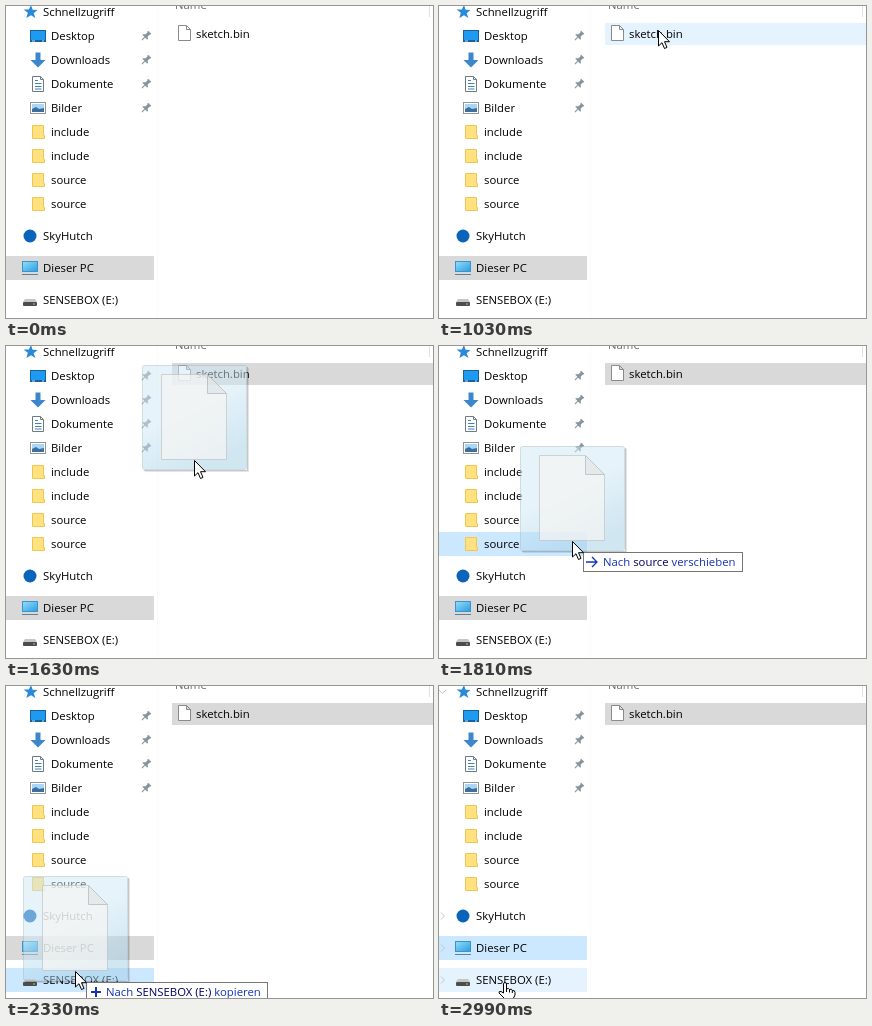
An HTML page that plays this animation: 427x312 px, repeating every 3020 ms.

```html
<!DOCTYPE html>
<html lang="de">
<head>
<meta charset="utf-8">
<title>Datei kopieren</title>
<style>
html, body { margin: 0; height: 100%; overflow: hidden; background: #fff; }
svg { display: block; width: 100vw; height: 100vh; }
text { font: 11.35px "Open Sans", "Noto Sans", sans-serif; white-space: pre; }
</style>
</head>
<body>
<svg viewBox="0 0 427 312">
  <defs>
    <linearGradient id="glass" x2=".5" y2="1">
      <stop stop-color="#cfe8f5"/><stop offset=".5" stop-color="#cfe9f6"/><stop offset="1" stop-color="#a3d0e7"/>
    </linearGradient>
    <linearGradient id="screen" x2="1" y2="1">
      <stop stop-color="#8fdcfb"/><stop offset="1" stop-color="#2f9fe0"/>
    </linearGradient>
    <g id="star"><path d="M1-7 2.6-2.2 7.5-2 3.7 1.2 5.4 6 1 3.3-3.6 6-2.2.8-6.5-2.6-1.2-2.6Z" fill="#2b8ad8"/></g>
    <g id="desktop">
      <rect x="-8" y="-6" width="16" height="12" fill="#14639f"/>
      <rect x="-7" y="-5" width="14" height="9" fill="#1e9bf0"/>
      <path d="M-6 5H-3M4 5H6" stroke="#bfe3ff"/>
    </g>
    <g id="down"><path d="M-2.5-7.5H2.5V0H7.5L0 7.5-7.5 0H-2.5Z" fill="#3c87cb"/></g>
    <g id="doc">
      <path d="M-5.5-7.5H2.5L5.5-4.5V7.5H-5.5Z" fill="#fff" stroke="#6f7b84"/>
      <path d="M-3-3.5H0M-3-.5H3.5M-3 2.5H3.5M-3 5H3.5" stroke="#3f83c0"/>
      <path d="M2.5-7.5V-4.5H5.5" fill="none" stroke="#6f7b84"/>
    </g>
    <g id="picture">
      <rect x="-7.5" y="-5.5" width="15" height="11" fill="#fff" stroke="#8b969d"/>
      <rect x="-6" y="-4" width="12" height="8" fill="#a9d6f5"/>
      <path d="M-6 4V1L-2-1 1 1 6 0V4Z" fill="#3d6f9c"/>
    </g>
    <g id="folder">
      <path d="M-5.5-6.500H5.500V3.500H6.500V6.500H-5.500Z" fill="#ffe17f" stroke="#efc750"/>
    </g>
    <g id="cloud"><circle r="6.5" fill="#0a64b9"/></g>
    <g id="pc">
      <rect x="-8" y="-7" width="16" height="11" fill="#3d93c9"/>
      <rect x="-7" y="-6" width="14" height="9" fill="url(#screen)"/>
      <path d="M-8 6.500H8" stroke="#5c8299"/>
    </g>
    <g id="drive">
      <path d="M-5-1H5L7 2H-7Z" fill="#c6c6c6"/>
      <rect x="-7" y="2" width="14" height="4" rx="1" fill="#4c4c4c"/>
      <path d="M3 4H5" stroke="#7ce07c"/>
    </g>
    <g id="pin" transform="rotate(45) scale(.88)">
      <path d="M-2.5-6H2.5V-5L1.8-4V-1L4 1V2H-4V1L-1.8-1V-4L-2.5-5Z" fill="#89959e"/>
      <path d="M0 2V6.5" stroke="#89959e" stroke-width="1.2"/>
    </g>
  </defs>

  <path d="M151.500 0V312" stroke="#fafafa"/>
  <path d="M423.500 0V11" stroke="#e2e2e2"/>
  <text x="169" y="3" fill="#6d6d6d">Name</text>
  <rect id="fileRow" x="166" y="17" width="261" height="22"/>
  <path d="M172.500 19.500H180.500L184.500 23.500V34.500H172.500ZM180.500 19.500V23.500H184.500" fill="#fff" stroke="#8a8a8a"/>
  <text x="190" y="32">sketch.bin</text>

  <rect id="pcRow" y="250" width="148" height="24"/>
  <rect id="hitRow" width="148" height="24"/>
  <g id="list"></g>
  <g id="chevrons" fill="none" stroke="#c2c6ca">
    <path d="M0 4 3.500 7.500 7 4M2 226.500 5.500 230 2 233.500M2 258.500 5.500 262 2 265.500M2 290.500 5.500 294 2 297.500"/>
  </g>

  <g id="ghost">
    <path d="M2 105.500H105.500V2" fill="none" stroke="#000" opacity=".22"/>
    <path d="M3 106.500H106.500V3" fill="none" stroke="#000" opacity=".1"/>
    <rect x=".5" y=".5" width="104" height="104" rx="2" fill="url(#glass)" stroke="#9fbccb" opacity=".5"/>
    <g opacity=".72">
      <path d="M19.500 9.500H65.500L84.500 28.500V94.500H19.500Z" fill="#f5f5f3" stroke="#c4c6c6"/>
      <path d="M65.500 9.500V28.500H84.500Z" fill="#e4e6e6" stroke="#b5b5b5"/>
    </g>
  </g>
  <g id="tip">
    <rect id="tipBox" x=".5" y=".5" height="19" fill="#fff" stroke="#767676"/>
    <path id="tipMark" fill="none" stroke="#1433b8"/>
    <text x="20" y="14" fill="#1433b8"><tspan>Nach </tspan><tspan id="tipName" fill="#000066"></tspan><tspan id="tipVerb"></tspan></text>
  </g>
  <g id="ban" fill="none" stroke="#cf2a32" stroke-width="1.700">
    <circle r="5.300" fill="#fff"/><path d="M-3.700-3.700 3.700 3.700"/>
  </g>
  <path id="arrow" d="M.5.500V16L4 12.700 6.500 18.500 9 17.400 6.500 11.700H11.500Z" fill="#fff" stroke="#000"/>
  <g id="hand" transform="translate(59 296)">
    <path d="M5.500 11V2Q5.500.5 7 .5T8.500 2V7Q11 5.500 11.500 7.500 14 6.500 14.300 8.500 17 8 17 10.500V13L15 17V20H7V17L1 11Q.5 9 3 9.500Z" fill="#fff" stroke="#000"/>
    <path d="M8.500 7V10M11.500 7.500V10.500M14.300 8.500V11" stroke="#000"/>
  </g>
</svg>
<script>
const LOOP = 3020, START = 360, CLICK = 1210, DRAG = 1350, DROP = 2950, END = 2990;
const $ = id => document.getElementById(id);
const show = (id, on) => $(id).style.display = on ? "" : "none";
const move = (id, x, y) => $(id).setAttribute("transform", `translate(${x} ${y})`);

// label, icon, row centre, pinned
const rows = [
  ["Schnellzugriff", "star", 6], ["Desktop", "desktop", 30, 1], ["Downloads", "down", 54, 1],
  ["Dokumente", "doc", 78, 1], ["Bilder", "picture", 102, 1],
  ["include", "folder", 126], ["include", "folder", 150],
  ["source", "folder", 174], ["source", "folder", 198],
  ["SkyHutch", "cloud", 230], ["Dieser PC", "pc", 262], ["SENSEBOX (E:)", "drive", 294]
];
$("list").innerHTML = rows.map(([label, icon, y, pinned], i) => {
  const child = i > 0 && i < 9;
  return `<use href="#${icon}" x="${child ? 32 : 24}" y="${y}"/>
    <text x="${child ? 45 : 37}" y="${y + 4}">${label}</text>` +
    (pinned ? `<g transform="translate(140 ${y})"><use href="#pin"/></g>` : "");
}).join("");

// time, x, y of the pointer tip
const path = [
  [360, 290, 298], [460, 281, 210], [560, 267, 110], [640, 253, 55], [720, 242, 31],
  [860, 223, 24], [900, 223, 24], [1030, 219, 24], [1350, 219, 26], [1420, 219, 33],
  [1600, 198, 98], [1720, 160, 160], [1810, 133, 195], [1850, 131, 207], [1880, 129, 210],
  [1960, 110, 235], [2060, 86, 261], [2200, 75, 275], [2330, 69, 285], [2370, 68, 286],
  [2420, 67, 286], [2580, 64, 288], [3020, 64, 288]
];

function pointer(t) {
  const i = Math.max(1, path.findIndex(p => p[0] > t));
  const [t0, x0, y0] = path[i - 1], [t1, x1, y1] = path[i];
  const k = (t - t0) / (t1 - t0);
  return [Math.round(x0 + (x1 - x0) * k), Math.round(y0 + (y1 - y0) * k)];
}

function setTip(label, copy) {
  $("tipName").textContent = label;
  $("tipVerb").textContent = copy ? " kopieren" : " verschieben";
  $("tipMark").setAttribute("d", copy ? "M5 10H15M10 5V15" : "M3 10H14M9 5 14 10 9 15");
  $("tipMark").setAttribute("stroke-width", copy ? 2 : 1.3);
  const width = $("tip").querySelector("text").getComputedTextLength();
  $("tipBox").setAttribute("width", Math.round(width) + 26);
}

function draw(t) {
  const [x, y] = pointer(t);
  const dragging = t >= DRAG && t < DROP, dropped = t >= DROP, done = t >= END;
  const inList = dragging && x < 148;
  const hit = inList && rows.find(r => Math.abs(y - r[2]) <= 12 && r[1] != "pc");

  const hover = t >= START && y >= 17 && y < 39;
  $("fileRow").setAttribute("fill", t >= DRAG ? "#d9d9d9" : t >= CLICK ? "#cce8ff" : hover ? "#e5f3ff" : "none");
  $("pcRow").setAttribute("fill", done ? "#cce8ff" : "#d9d9d9");
  show("hitRow", hit || dropped);
  $("hitRow").setAttribute("y", (hit ? hit[2] : 294) - 12);
  $("hitRow").setAttribute("fill", done ? "#e5f3ff" : "#cce8ff");
  show("chevrons", dropped);

  show("ghost", dragging);
  move("ghost", x - 52, y - 95);
  show("tip", hit);
  move("tip", x + 11, y + 11);
  if (hit) setTip(hit[0], hit[1] == "drive");
  show("ban", inList && !hit);
  move("ban", x + 21, y + 22);

  show("arrow", t >= START && !dropped);
  move("arrow", x, y);
  show("hand", dropped);
}

const begin = performance.now();
function frame() {
  draw((performance.now() - begin) % LOOP);
  requestAnimationFrame(frame);
}
frame();
</script>
</body>
</html>
```
